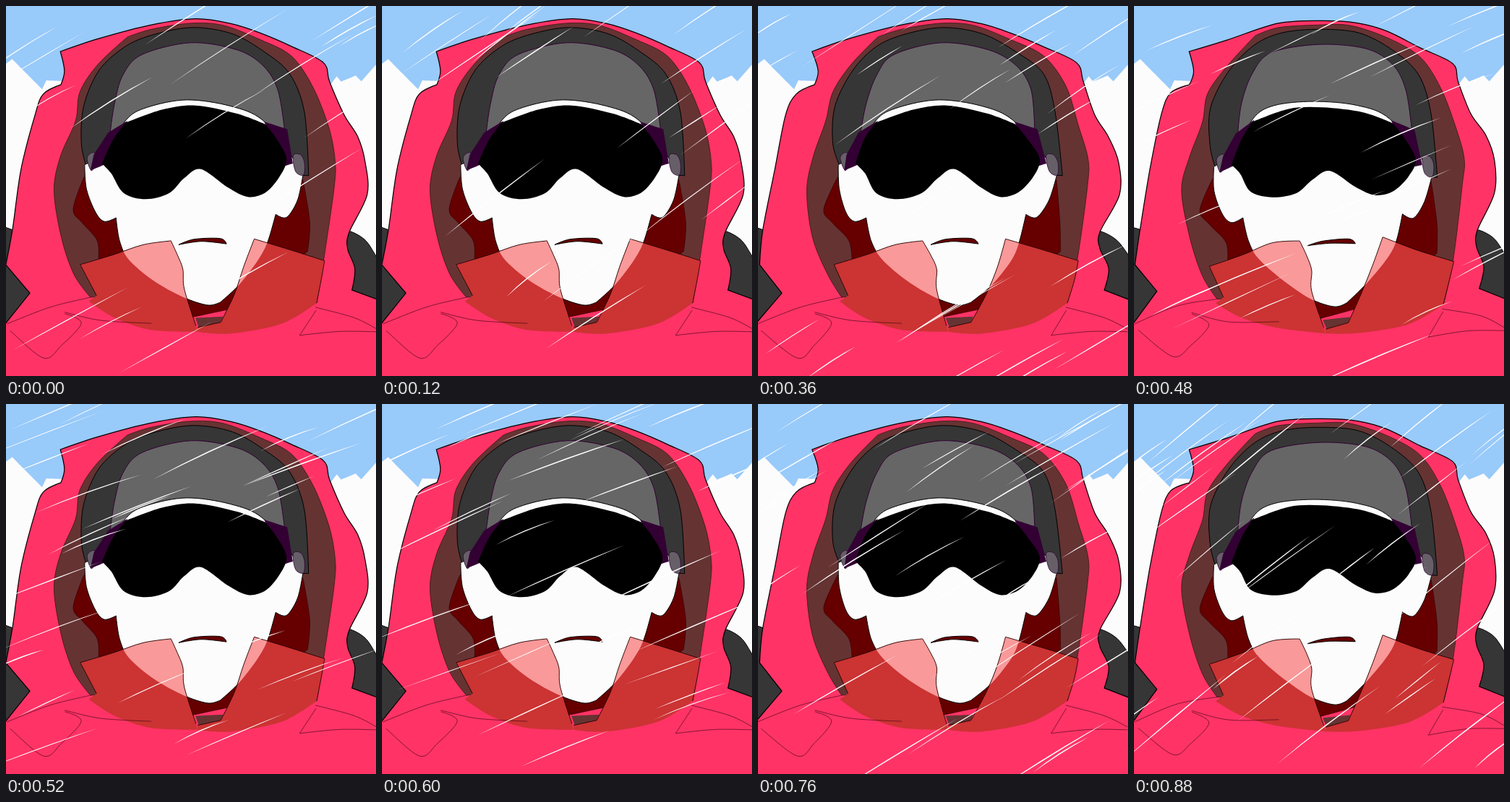
Animation, 512 px wide and 512 px high, one loop 0.92 s. Source, as an HTML page with a canvas:

```html
<!DOCTYPE html>
<html>
<head>
<meta charset="utf-8">
<style>
html, body { margin: 0; width: 100%; height: 100%; overflow: hidden; }
canvas { display: block; }
</style>
</head>
<body>
<canvas id="stage" width="512" height="512"></canvas>
<script>
const ctx = document.getElementById('stage').getContext('2d');
const STEP = 40, STEPS = 23, POSE_STEPS = 3, POSES = 4;
let wobble = 0;

// Smooth line through "x,y" points; a leading * marks a sharp corner.
// A gentle wave shifts the points, so each pose looks drawn anew.
function curve(text, closed = true) {
  const pts = text.split(' ').map(s => {
    const [x, y] = s.replace('*', '').split(',').map(Number);
    return {
      x: x + 1.3 * Math.sin(y / 21 + wobble),
      y: y + 1.3 * Math.sin(x / 24 + wobble * 2),
      k: s[0] === '*' ? 0 : 0.16
    };
  });
  const n = pts.length;
  const at = i => closed ? pts[(i + n) % n] : pts[Math.max(0, Math.min(n - 1, i))];
  const path = new Path2D();
  path.moveTo(pts[0].x, pts[0].y);
  for (let i = 0; i < (closed ? n : n - 1); i++) {
    const a = at(i - 1), b = at(i), c = at(i + 1), d = at(i + 2);
    path.bezierCurveTo(b.x + (c.x - a.x) * b.k, b.y + (c.y - a.y) * b.k,
      c.x - (d.x - b.x) * c.k, c.y - (d.y - b.y) * c.k, c.x, c.y);
  }
  return path;
}

function line(text, color, width) {
  ctx.strokeStyle = color;
  ctx.lineWidth = width;
  ctx.stroke(curve(text, false));
}

function shape(text, fill, stroke, width = 1) {
  const path = curve(text);
  ctx.fillStyle = fill;
  ctx.fill(path);
  if (stroke) {
    ctx.strokeStyle = stroke;
    ctx.lineWidth = width;
    ctx.stroke(path);
  }
  return path;
}

function drawBackground() {
  wobble = 0;
  ctx.fillStyle = '#98cafa';
  ctx.fillRect(0, 0, 512, 512);
  shape('*-3,83 *9,73 *51,114 *57,102 *80,104 *110,150 *430,150 *451,108 *459,97 *465,104 *485,95 *493,103 *515,78 *515,515 *-3,515', '#fcfcfc');
}

function drawCoat() {
  shape('*-3,306 *40,320 *40,450 *-3,450', '#363636', '#000');
  shape('*460,312 476,311 498,324 *516,351 *516,450 *460,450', '#363636', '#000');
  shape('*-3,520 *-3,441 *33,396 *1,358 8,308 22,225 39,150 52,121 *77,109 82,90 *75,63 ' +
    '128,46 200,25 262,19 310,24 350,36 395,57 440,79 449,105 467,150 486,180 498,215 ' +
    '500,260 474,312 473,335 484,362 *479,392 *515,406 *515,520', '#ff3366', '#000', 1.2);
  shape('*116,404 95,372 76,320 67,255 76,208 95,160 103,120 128,82 *167,42 200,31 255,25 ' +
    '300,27 352,46 395,70 425,112 445,167 456,212 455,250 441,350 *429,412', '#663333', '#3a1616', 0.8);
  shape('*109,238 92,282 104,301 126,326 *129,355 *255,432 *305,420 *418,341 419,300 *412,242', '#660000', '#300', 0.7);
}

function drawHead() {
  shape('*113,225 104,192 107,140 130,90 165,55 205,38 258,31 312,38 358,63 394,95 ' +
    '412,148 *420,236 *406,235 *250,210', '#363636', '#000');
  shape('*143,176 150,135 163,95 188,66 255,52 320,60 357,82 377,116 *384,170 250,165', '#666', '#330033');
  const face = shape('*110,221 112,255 123,287 135,299 *151,293 157,325 171,350 205,379 245,404 ' +
    '278,415 *296,410 323,385 350,350 362,325 *372,288 387,293 403,270 *412,236 *398,212 ' +
    '354,157 310,138 250,131 195,139 165,157 *140,205', '#fcfcfc', '#000');
  shape('113,212 120,204 128,209 120,229', '#665f68', '#330033', 0.8);
  shape('398,208 408,207 414,218 413,235 402,230', '#665f68', '#330033', 0.8);
  shape('*118,229 *122,207 *140,176 *167,158 *138,220', '#330033');
  shape('*356,159 *388,171 *398,219 *386,222', '#330033');
  shape('*164,161 215,143 262,139 318,148 *358,163 374,184 389,212 380,236 360,257 335,263 ' +
    '308,251 271,227 248,239 226,259 193,266 163,258 147,232 *134,219 147,186', '#000');
  shape('*239,331 260,324 296,322 *305,329 270,327', '#660000', '#000');
  return face;
}

function drawCollar(face) {
  const left = '*125,402 *104,359 150,344 190,329 *228,325 238,345 246,365 247,393 *262,444';
  const right = '*264,446 *296,438 316,398 330,360 *343,321 390,337 *442,353 437,380 *429,412';
  const panels = [left + ' *264,452 200,447 150,432 *114,410', right + ' 380,440 310,453 *264,452'];
  shape('*261,433 *299,430 *296,440 *266,447', '#663333');
  panels.forEach(p => shape(p, '#cc3333'));
  ctx.save();
  ctx.clip(face);
  panels.forEach(p => shape(p, '#f99999'));
  ctx.restore();
  [left, right].forEach(edge => line(edge, '#200', 0.9));
}

function drawFolds() {
  ['0,440 60,416 118,404', '*80,426 103,440 77,470 53,486 5,449', '80,424 130,436 200,438',
    '427,418 480,430 512,446', '*428,422 *406,457 460,450 512,450']
    .forEach(f => line(f, 'rgba(50,0,15,.75)', 0.8));
}

function seeded(seed) {
  return () => {
    seed = (seed + 0x6D2B79F5) | 0;
    let t = Math.imul(seed ^ seed >>> 15, 1 | seed);
    t ^= t + Math.imul(t ^ t >>> 7, 61 | t);
    return ((t ^ t >>> 14) >>> 0) / 4294967296;
  };
}

// The wind swings the streaks between about 22 and 38 degrees while the snow thickens.
function drawSnow(step) {
  const rnd = seeded(step * 7919 + 11);
  const angle = 30 - 8 * Math.cos((step - 14) * 0.36);
  const count = 16 + step * 0.9;
  ctx.fillStyle = '#fff';
  for (let i = 0; i < count; i++) {
    const x = rnd() * 512, y = i % 3 ? 60 + rnd() * 452 : rnd() * 90;
    const half = 35 + rnd() * 65, bend = -rnd() * 5, w = 1 + rnd() * 0.7;
    ctx.save();
    ctx.translate(x, y);
    ctx.rotate(-(angle + rnd() * 6 - 3) * Math.PI / 180);
    ctx.beginPath();
    ctx.moveTo(-half, 0);
    ctx.quadraticCurveTo(0, bend - w, half, 0);
    ctx.quadraticCurveTo(0, bend + w, -half, 0);
    ctx.fill();
    ctx.restore();
  }
}

function frame(now) {
  const step = Math.max(1, Math.floor(now / STEP) % STEPS);
  const pose = Math.floor((step - 1) / POSE_STEPS) % POSES;
  drawBackground();
  wobble = pose * Math.PI * 2 / POSES;
  drawCoat();
  drawCollar(drawHead());
  drawFolds();
  drawSnow(step);
  requestAnimationFrame(frame);
}
requestAnimationFrame(frame);
</script>
</body>
</html>
```
